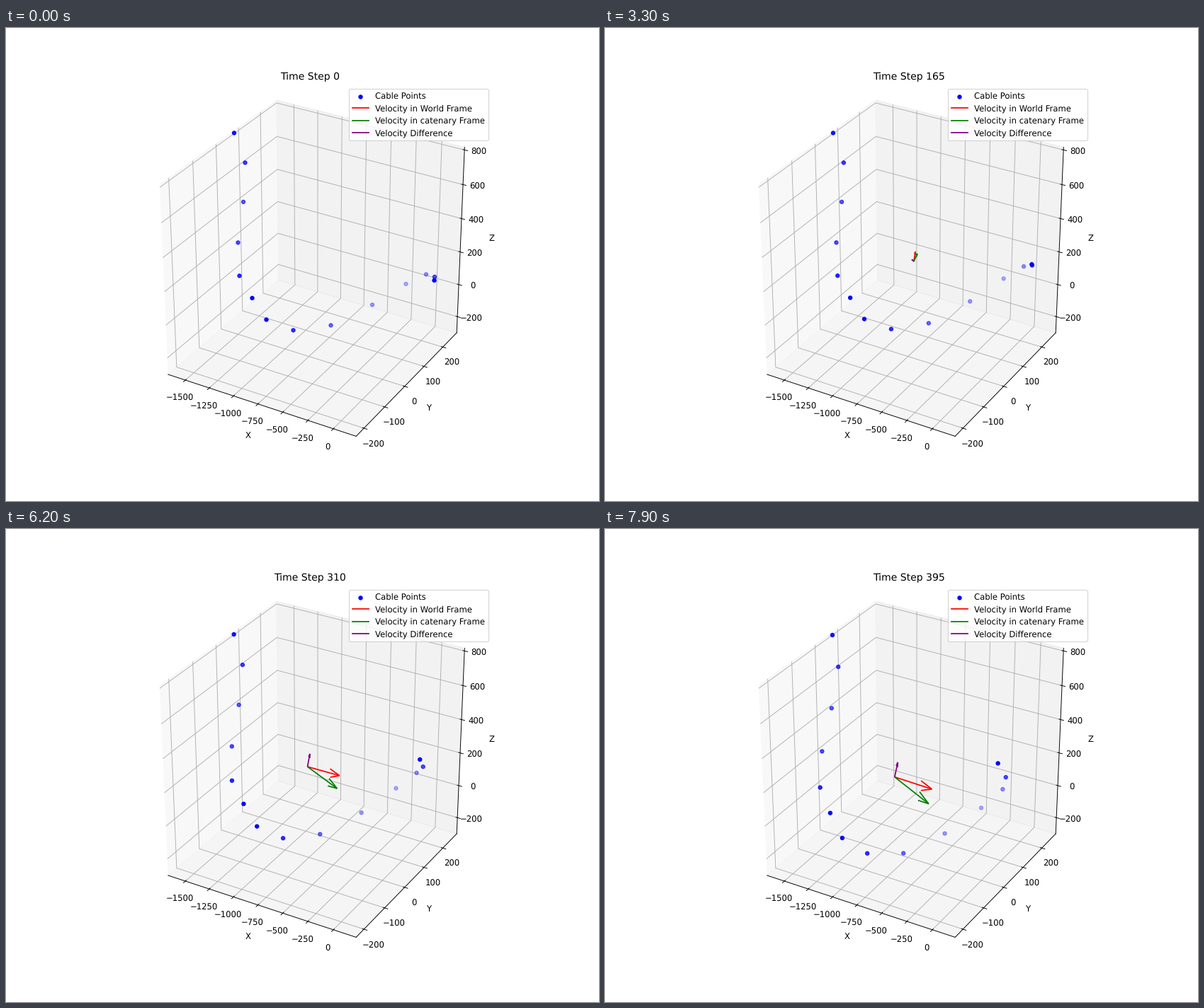
A matplotlib script for the animation above (8 s loop, 837 by 669 pixels).

```python
import numpy as np
import matplotlib.pyplot as plt
from matplotlib.animation import FuncAnimation
from matplotlib.collections import LineCollection
from matplotlib.lines import Line2D

W, H, DPI = 837, 669, 83.7
FRAMES, INTERVAL, STEP = 80, 100, 5
plt.rcParams["text.hinting"] = "none"


def curve(knots, values, at):
    """Cubic Hermite curve through a few knots."""
    knots, values = np.array(knots, float), np.array(values, float)
    k = np.clip(np.searchsorted(knots, at, "right") - 1, 0, len(knots) - 2)
    span = knots[k + 1] - knots[k]
    u = (at - knots[k]) / span
    m = np.gradient(values, knots)
    return ((2 * u**3 - 3 * u**2 + 1) * values[k] + (u**3 - 2 * u**2 + u) * m[k] * span
            + (3 * u**2 - 2 * u**3) * values[k + 1] + (u**3 - u**2) * m[k + 1] * span)


# Cable at rest, in stage pixels
REST = np.array([(322, 148.5), (337.5, 190.5), (335, 246), (327.5, 303.5), (329.5, 350.5),
                 (347.5, 382), (367.5, 412.5), (405.5, 427.5), (458.5, 420.5), (517, 391.5),
                 (564.5, 362), (593, 348.5), (605, 352), (604.5, 357)])
N = len(REST)
S = np.arange(N)
U = S / (N - 1)

# The free end is lifted first, then the whole cable swings out
LIFT = np.column_stack([-2.5 * U**0.5, -26.5 * U**4.2])
KNOTS = [0, 3, 6, 9, 11, 13]
SWING = np.column_stack([curve(KNOTS, [-1, -20, -31, -35.5, -29.5, -47.5], S),
                         curve(KNOTS, [1.5, 11, 25.5, 44.5, 32, -0.5], S)])

# Blue, more opaque towards the viewer
BLUE = np.zeros((N, 4))
BLUE[:, 2] = 1
BLUE[:, 3] = np.clip(curve([0, 2, 5.5, 10.5, 13], [0.92, 0.65, 1, 0.32, 1], S), 0.3, 1)

# Stage pixels per data unit along X and Z
TO_PX = np.array([[0.1392, 0], [0.0402, -0.2374]])
TO_DATA = np.linalg.inv(TO_PX)


def cable(t):
    lift = 1.17 * np.sin(np.pi * t / 11.6) ** 1.25
    swing = (max(t - 3.6, 0) / 4.3) ** 2
    return REST + lift * LIFT + swing * SWING


def velocities(t):
    """World, catenary and difference vectors in stage pixels."""
    start = 1 - np.exp(-t / 0.7)
    turn = 1 / (1 + np.exp((5.15 - t) / 0.6))
    world = start * (np.array([0, -15.5]) + turn * np.array([53, 33]))
    diff = start * (np.array([-3, -2]) + turn * np.array([7.5, -19]))
    return world, world - diff, diff


def arrow(tail, vec):
    """Shaft and two barbs, turned 15 degrees in the data's vertical plane."""
    tip = tail + vec
    segs = [(tail, tip)]
    for a in np.radians([15, -15]):
        turned = np.array([[np.cos(a), -np.sin(a)], [np.sin(a), np.cos(a)]]) @ TO_DATA @ vec
        segs.append((tip, tip - 0.3 * TO_PX @ turned))
    return segs


fig = plt.figure(figsize=((W + 0.01) / DPI, (H + 0.01) / DPI), dpi=DPI)
ax = fig.add_subplot(111, projection="3d")
ax.set_box_aspect((1, 1, 1))
ax.set(xlim=(-1683, 221), ylim=(-237, 276.2), zlim=(-301.7, 815.8),
       xlabel="X", ylabel="Y", zlabel="Z")

stage = fig.add_axes([0, 0, 1, 1])
stage.set(xlim=(0, W), ylim=(H, 0))
stage.axis("off")
dots = stage.scatter(*REST.T, s=20, color="b", zorder=2)
LABELS = {"red": "Velocity in World Frame", "green": "Velocity in catenary Frame",
          "purple": "Velocity Difference"}
arrows = [stage.add_collection(LineCollection([], colors=c, linewidths=1.5, zorder=3), autolim=False)
          for c in LABELS]
ax.legend([dots] + [Line2D([], [], color=c, lw=1.5) for c in LABELS],
          ["Cable Points", *LABELS.values()], loc="upper right")
dots.set_color(BLUE)


def update(i):
    t = i * INTERVAL / 1000
    pts = cable(t)
    dots.set_offsets(pts)
    tail = pts.mean(axis=0) + (0.5, 0)
    for lines, vec in zip(arrows, velocities(t)):
        lines.set_segments(arrow(tail, vec) if i else [])
    ax.set_title(f"Time Step {i * STEP}")
    return [dots, *arrows]


anim = FuncAnimation(fig, update, frames=FRAMES, interval=INTERVAL, repeat=True, blit=False)
plt.show()
```
